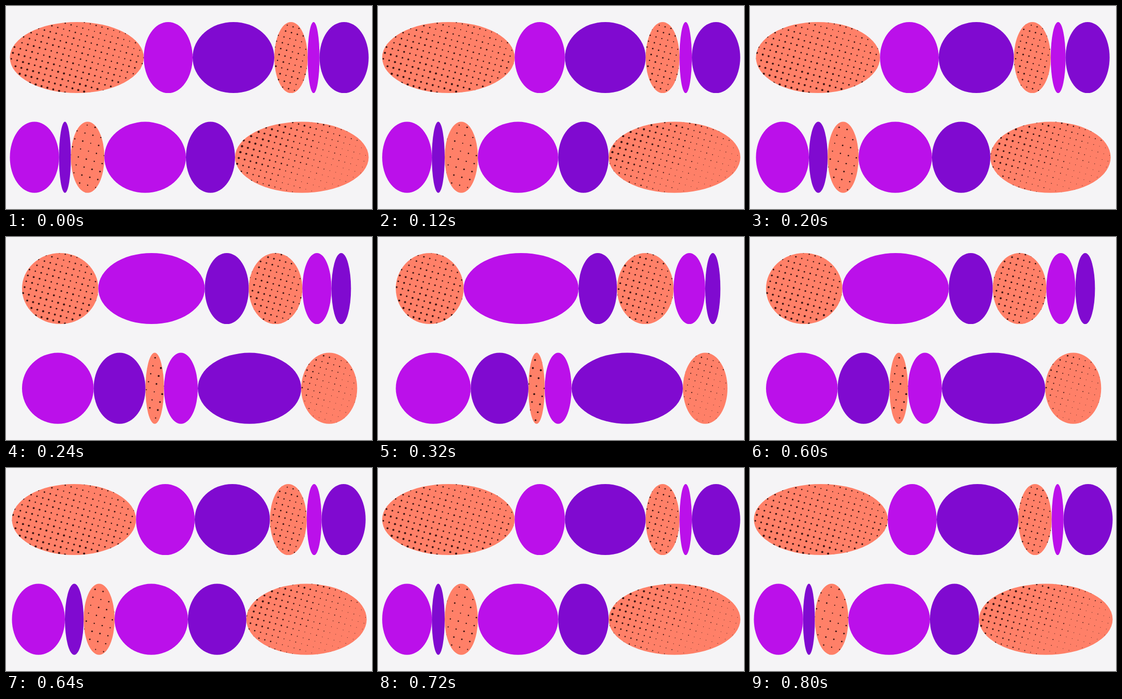
An HTML page with a canvas that plays this animation: 708 by 392 pixels, repeating every 0.84 s.

```html
<!DOCTYPE html>
<html lang="en">
<head>
<meta charset="utf-8">
<title>Ellipses</title>
<style>
  html, body { margin: 0; width: 100%; height: 100%; overflow: hidden; background: #f5f4f6; }
  canvas { display: block; }
</style>
</head>
<body>
<canvas id="stage" width="708" height="392"></canvas>
<script>
const ctx = document.getElementById('stage').getContext('2d');
const BG = '#f5f4f6', CORAL = '#ff8068', MAGENTA = '#bb10ea', PURPLE = '#800ad0', INK = '#3c1412';
const STEP = 40, STEPS = 21, ANGLE = 15.5 * Math.PI / 180;

// Halftone screens: lattice anchor, spacing, and dot radius by place
const bigLeft = { x: 136, y: 88, gap: 11.75, radius: (x, y) => 1.55 + (y - x * 0.45 - 40) / 190 };
const smallTop = { x: 490, y: 144, gap: 11.75, radius: (x, y) => 1.45 + (530 - x) / 200 };
const smallBottom = { x: 157, y: 230, gap: 15.95, radius: x => x > 290 ? 1.7 : 1.35 };
const bigRight = { x: 566, y: 228, gap: 11.75, radius: (x, y) => 2.45 - (x - 450) / 160 - (y - 225) / 125 };

// Each row: edges between neighbouring ellipses in both poses, and fills
const rows = [
  {
    y: 99.5,
    from: [7.5, 266.5, 361, 519, 583.5, 606.5, 701.5],
    to: [35, 163.5, 388.5, 461.2, 571.5, 633.5, 661.5],
    fills: [bigLeft, MAGENTA, PURPLE, smallTop, MAGENTA, PURPLE]
  },
  {
    y: 292.2,
    from: [7.5, 102.5, 125.5, 190.3, 348, 443, 701.5],
    to: [35, 181, 294.5, 325.3, 375, 593, 675.5],
    fills: [MAGENTA, PURPLE, smallBottom, MAGENTA, PURPLE, bigRight]
  }
];

const clamp = (v, lo, hi) => Math.min(hi, Math.max(lo, v));

function noise(i, j) {
  const n = Math.sin(i * 12.99 + j * 78.23) * 43758.5;
  return n - Math.floor(n) - 0.5;
}

// Very steep ease in and out, 360 ms around the given midpoint
function ease(time, middle) {
  const d = time - middle;
  const u = clamp(Math.abs(d) / 180, 0, 1) ** 0.32;
  return 0.5 + Math.sign(d) * 0.5 * (1 - (1 - u) ** 1.8);
}

function drawDots({ x, y, gap, radius }, left, right, cy) {
  const cos = gap * Math.cos(ANGLE), sin = gap * Math.sin(ANGLE);
  ctx.fillStyle = INK;
  for (let i = -32; i <= 32; i++) {
    for (let j = -32; j <= 32; j++) {
      const px = x + i * cos - j * sin, py = y + i * sin + j * cos;
      if (px < left - 3 || px > right + 3 || Math.abs(py - cy) > 72) continue;
      const r = clamp(radius(px, py) + noise(i, j) * 0.5, 0.55, 2.5);
      ctx.beginPath();
      ctx.arc(px, py, r, 0, 2 * Math.PI);
      ctx.fill();
    }
  }
}

function drawEllipse(left, right, cy, fill) {
  const dotted = typeof fill === 'object';
  ctx.save();
  ctx.beginPath();
  ctx.ellipse((left + right) / 2, cy, (right - left) / 2, 68.6, 0, 0, 2 * Math.PI);
  ctx.fillStyle = dotted ? CORAL : fill;
  ctx.fill();
  if (dotted) {
    ctx.clip();
    drawDots(fill, left, right, cy);
  }
  ctx.restore();
}

function draw(time) {
  const p = ease(time, 220) - ease(time, 620);
  ctx.fillStyle = BG;
  ctx.fillRect(0, 0, 708, 392);
  for (const { y, from, to, fills } of rows) {
    const edges = from.map((e, i) => e + (to[i] - e) * p);
    fills.forEach((fill, i) => drawEllipse(edges[i], edges[i + 1], y, fill));
  }
}

const start = performance.now();
function tick() {
  const step = Math.floor((performance.now() - start + 0.5) / STEP) % STEPS;
  draw(step * STEP);
  requestAnimationFrame(tick);
}
tick();
</script>
</body>
</html>
```
